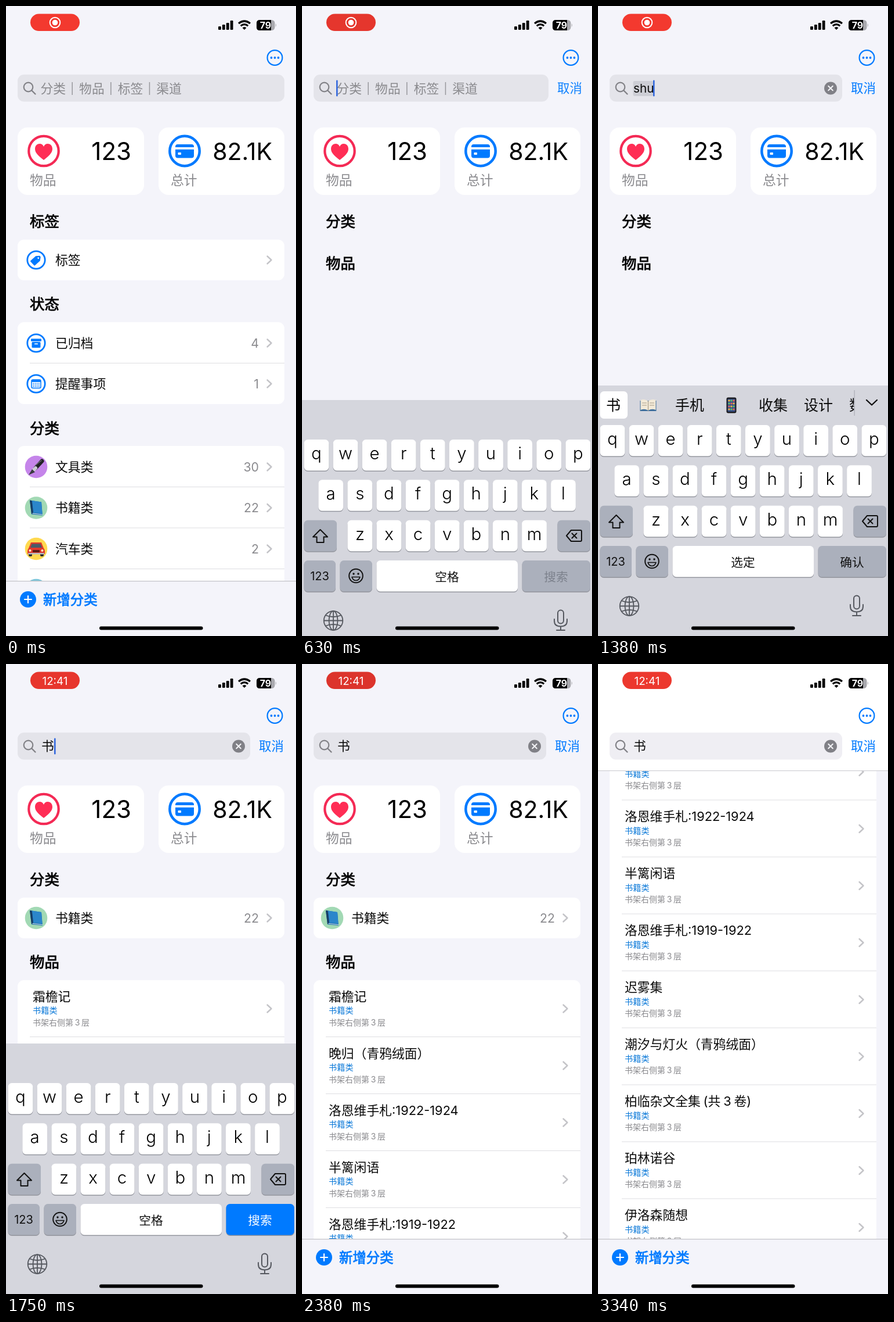
Recreate the animation shown at these times as an HTML page. Size 500 px wide and 1084 px high, loop 3.55 s.

```html
<!DOCTYPE html>
<html lang="zh-CN">
<head>
<meta charset="utf-8">
<title>Item search</title>
<style>
html, body { margin: 0; width: 100%; height: 100%; overflow: hidden; background: #f4f4fa; }
svg { display: block; width: 100%; height: 100%; font-family: Inter, 'Noto Sans CJK SC', 'Noto Sans CJK', sans-serif; }
text { white-space: pre; word-spacing: -1.3px; }
</style>
</head>
<body>
<svg id="stage" viewBox="0 0 500 1084"></svg>
<script>
const LOOP = 3550, LAST_STEP = 26, LAST_START = 3340;
const BG = '#f4f4fa', BLUE = '#007aff', GREY = '#8a8a8e', LINE = '#dddde1', INK = '#0a0a0a';
const BOOKS = ['霜檐记', '晚归（青鸦绒面）', '洛恩维手札:1922-1924', '半篱闲语', '洛恩维手札:1919-1922',
  '迟雾集', '潮汐与灯火（青鸦绒面）', '柏临杂文全集 (共 3 卷)', '珀林诺谷', '伊洛森随想'];
const stage = document.getElementById('stage');

const rect = (x, y, w, h, fill, r = 0, extra = '') =>
  `<rect x="${x}" y="${y}" width="${w}" height="${h}" rx="${r}" fill="${fill}" ${extra}/>`;
const circle = (x, y, r, fill) => `<circle cx="${x}" cy="${y}" r="${r}" fill="${fill}"/>`;
const ring = (x, y, r, color, w) =>
  `<circle cx="${x}" cy="${y}" r="${r}" fill="none" stroke="${color}" stroke-width="${w}"/>`;
const stroke = (d, color, w = 2) =>
  `<path d="${d}" fill="none" stroke="${color}" stroke-width="${w}" stroke-linecap="round" stroke-linejoin="round"/>`;
const fill = (d, color) => `<path d="${d}" fill="${color}"/>`;
// Text placed by its vertical centre
const text = (x, cy, s, size, color = INK, extra = '') =>
  `<text x="${x}" y="${cy + size * .365}" font-size="${size}" fill="${color}" ${extra}>${s}</text>`;
// A thin outline gives a weight between regular and bold
const semibold = (x, cy, s, size, color) => text(x, cy, s, size, color, `stroke="${color}" stroke-width=".8"`);
const at = (x, y, body) => `<g transform="translate(${x} ${y})">${body}</g>`;
const MID = 'text-anchor="middle"', END = 'text-anchor="end"';

const title = (y, s) => semibold(41, y, s, 25.4, '#000');
const card = (y, h) => rect(20, y, 460, h, '#fff', 11);
const divider = y => rect(41, y - .5, 439, 1, LINE);
const chevron = y => stroke(`M450.5 ${y - 6.5}l7 6.5-7 6.5`, '#c4c4c8', 2.4);

const icons = {
  tag: ring(0, 0, 15.2, BLUE, 2.8) + '<g transform="rotate(-42)">' +
    fill('M-8-5.5H4L9-1.5Q10 0 9 1.5L4 5.5H-8Q-9 5.5-9 4.5V-4.5Q-9-5.5-8-5.5Z', BLUE) + circle(5, 0, 1.4, '#fff') + '</g>',
  archive: ring(0, 0, 15.2, BLUE, 2.8) + rect(-9, -7.5, 18, 4.5, BLUE, 1) + rect(-7.5, -2, 15, 10, BLUE, 1.5) +
    rect(-3, .5, 6, 1.8, '#fff', .9),
  calendar: ring(0, 0, 15.2, BLUE, 2.8) + rect(-8, -7, 16, 14.5, 'none', 2.5, `stroke="${BLUE}" stroke-width="1.6"`) +
    rect(-8, -7, 16, 4, BLUE, 1.5) +
    [0, 1, 2].map(r => [0, 1, 2, 3].map(c => circle(-4.8 + c * 3.2, -.6 + r * 2.7, .95, BLUE)).join('')).join(''),
  pen: circle(0, 0, 19.3, '#c585ea') + stroke('M-1 2L10-10', '#222226', 7) + stroke('M-1-3L9-11', '#6a6a72', 1.6) +
    stroke('M-4 5L-1 2', '#c9c9d2', 6) + fill('M-7 4L-2 9-13 14Z', '#3a3a40'),
  book: circle(0, 0, 19.3, '#a2d9b4') + fill('M-11-13L9-10 11 13-8 11Z', '#1769ad') + fill('M-7-12.4L9-10 10.5 10-5 8Z', '#2b86cb') +
    fill('M-11-13L-7.5-12.4-5 8-8 11Z', '#173e66') + stroke('M-6 9.5L10.5 11.5', '#dfe8ee', 1.2),
  car: circle(0, 0, 19.3, '#ffd94f') + rect(-13, 6, 6, 7, '#28282c', 2) + rect(7, 6, 6, 7, '#28282c', 2) +
    fill('M-9-11H9L13-1Q15 1 15 4V9H-15V4Q-15 1-13-1Z', '#e0392d') + fill('M-7.5-8.5H7.5L10-2H-10Z', '#4a5a68') +
    circle(-10.5, 3, 2, '#fff3c4') + circle(10.5, 3, 2, '#fff3c4') + rect(-6, 2, 12, 4, '#5c1a18', 1) + rect(-14, 7, 28, 2.5, '#b9bcc2', 1),
};

const row = (y, icon, label, count = '') =>
  at(52, y, icons[icon]) + text(85, y, label, 21.8) + text(436, y, count, 21.3, GREY, END) + chevron(y);

const stats =
  rect(20, 209, 218, 116, '#fff', 17) + rect(263, 209, 217, 116, '#fff', 17) +
  ring(65, 249.5, 25.7, '#f42a55', 4.2) +
  fill('M65 265C57 259 50 253 50 246C50 240 54 237 58 237Q63 237 65 242Q67 237 72 237C76 237 80 240 80 246C80 253 73 259 65 265Z', '#ff2d55') +
  ring(308, 249.5, 25.7, BLUE, 4.5) + rect(292, 238, 32, 23.5, BLUE, 4) + rect(292, 243, 32, 3.8, '#fff') + rect(296.5, 252, 5.5, 4, '#fff', 1) +
  text(216, 250, '123', 42, '#000', END) + text(459, 250, '82.1K', 41, '#000', END) +
  text(41, 300, '物品', 22.8, GREY) + text(284, 300, '总计', 22.8, GREY);

const home =
  title(371, '标签') + card(402, 70) + row(437, 'tag', '标签') +
  title(513, '状态') + card(544, 141) + row(580, 'archive', '已归档', 4) + divider(614.5) + row(650, 'calendar', '提醒事项', 1) +
  title(727, '分类') + card(757, 300) + row(793, 'pen', '文具类', 30) + divider(827.5) + row(863.5, 'book', '书籍类', 22) +
  divider(898) + row(934, 'car', '汽车类', 2) + divider(968.5) + circle(52, 1005, 19.3, '#7fc6da');

const noResults = title(371, '分类') + title(442.5, '物品');

const results =
  title(371, '分类') + card(402, 70) + row(437, 'book', '书籍类', 22) +
  title(513, '物品') + card(544, BOOKS.length * 98) +
  BOOKS.map((name, i) => at(0, i * 98,
    text(46, 572, name, 21.8) + text(46, 596, '书籍类', 14.2, '#0a78d8') + text(46, 616.5, '书架右侧第 3 层', 14, GREY) +
    chevron(593) + (i < BOOKS.length - 1 ? divider(641.5) : ''))).join('');

const bottomBar =
  rect(0, 990, 500, 94, BG) + rect(0, 989, 500, 1.2, '#c2c2c7') + circle(38, 1021, 14, BLUE) +
  stroke('M32 1021H44M38 1015V1027', '#fff', 2.2) + semibold(64, 1021.5, '新增分类', 23.4, BLUE);

const wifi = '<g fill="none" stroke="#000" stroke-width="3.2"><path d="M401 30Q411 22 421 30"/><path d="M404.7 34.2Q411 29.2 417.3 34.2"/></g>' +
  fill('M407.5 37.5Q411 34.5 414.5 37.5L411 41Z', '#000');
const statusBar =
  [6, 9, 12, 16].map((h, i) => rect(366 + i * 6.9, 41 - h, 4.8, h, '#000', 1.3)).join('') + wifi +
  rect(432, 24, 31.5, 18, '#a9a9ae', 5.5) + fill('M437.5 24H457V42H437.5Q432 42 432 36.5V29.5Q432 24 437.5 24Z', '#000') +
  fill('M464.8 30Q467 33 464.8 36Z', '#a9a9ae') + text(447.5, 33, '79', 16, '#fff', MID + ' font-weight="700"') +
  ring(463.5, 89, 12.9, BLUE, 2.2) + [-6, 0, 6].map(d => circle(463.5 + d, 89, 1.9, BLUE)).join('');

const PULSE = [[0, .7], [500, .05], [1000, 1], [1380, .7], [2000, .12], [2880, 0], [3340, .5], [3550, .7]];
function interpolate(points, t) {
  const i = Math.max(1, points.findIndex(p => p[0] >= t));
  const [t0, a] = points[i - 1], [t1, b] = points[i];
  return a + (b - a) * (t - t0) / (t1 - t0);
}

function pill(step, t) {
  const k = interpolate(PULSE, t), mix = (a, b) => Math.round(a + (b - a) * k);
  return rect(42, 13.5, 85, 29.5, `rgb(${mix(218, 254)},${mix(52, 59)},${mix(44, 48)})`, 14.75) +
    (step < 14 ? ring(84.5, 28.5, 8.8, '#fff', 2) + circle(84.5, 28.5, 4.8, '#fff')
               : text(84.5, 28.8, '12:41', 18.8, '#fff', MID));
}

function searchBar({ query, composing, p, caret, white }) {
  const widths = { '': 0, s: 11, sh: 23, shu: 35, '书': 23 };
  const caretX = query ? 60 + widths[query] : 59;
  let out = rect(20, 118, 401 + 59 * p, 46.5, white ? '#efeef3' : '#e4e4ea', 11) +
    ring(38.5, 139.5, 7.8, '#828287', 2.2) + stroke('M44.5 145.5L50.5 151.5', '#828287', 2.4);
  if (composing) out += rect(60.5, 129, widths[query], 26, '#cdced5', 3);
  if (query) {
    out += text(61, 141.5, query, composing ? 20.7 : 21.8) + circle(401, 141.5, 11, '#808086') +
      stroke('M397.2 137.7l7.6 7.6m0-7.6l-7.6 7.6', '#f4f4f8', 2);
  } else {
    out += ['分类', '物品', '标签', '渠道'].map((s, i) => text(59.5 + 66.6 * i, 142, s, 21.8, GREY) +
      (i < 3 ? rect(113.5 + 66.6 * i, 131, 1.5, 22, '#97979c') : '')).join('');
  }
  if (caret) out += rect(caretX, 127.5, 2.6, 28, '#3268dd', 1.3);
  if (p < 1) out += text(436 + 59 * p, 141, '取消', 21.5, BLUE, `opacity="${1 - p}"`);
  return out;
}

const key = (x, y, w, color = '#fff') => rect(x, y + 1.5, w, 53.5, '#94969e', 6.5) + rect(x, y, w, 53.5, color, 6.5);
const KEY_ROWS = [['qwertyuiop', 3.5, 721], ['asdfghjkl', 28.3, 790.3], ['zxcvbnm', 78.5, 859.7]];
const keyPos = c => {
  const [s, x, y] = KEY_ROWS.find(r => r[0].includes(c));
  return [x + 50.1 * s.indexOf(c), y];
};
const letter = (x, y, c, size) => `<text x="${x}" y="${y}" font-size="${size}" font-weight="300" fill="#000" ${MID}>${c}</text>`;

function popup(c) {
  const [x, y] = keyPos(c);
  return at(x + 21.5, y, `<path d="M-27-83H27Q38-83 38-72V-32Q38-23 32-18L26-12Q21.5-8 21.5-1V48Q21.5 54 15 54H-15Q-21.5 54-21.5 48V-1Q-21.5-8-26-12L-32-18Q-38-23-38-32V-72Q-38-83-27-83Z"
    fill="#fff" stroke="#b9bac2" stroke-width=".8"/>` + letter(0, -30, c, 45));
}

const openBook = at(86.5, 687, fill('M-14-8L14-8V10H-14Z', '#3e6e9c') + fill('M0-7Q-6-12-13-9V8Q-6 5 0 9Q6 5 13 8V-9Q6-12 0-7Z', '#f3ead8') +
  stroke('M0-7V9M-10-4H-3M-10 0H-3M3-4H10M3 0H10', '#a79c88', 1.2));
const phone = at(230, 687, rect(-8.5, -13.5, 17, 27, '#1c1c20', 3) + rect(-6.5, -11, 13, 22, '#36518a', 1) +
  [0, 1, 2, 3].map(r => [0, 1, 2].map(c =>
    rect(-5.5 + c * 4, -9.5 + r * 5, 3, 3, ['#f4b63e', '#62c46a', '#e9655c'][(r + c) % 3], .8)).join('')).join(''));
const candidates =
  rect(3.5, 663, 47.5, 47, '#fff', 6.5) + text(26.5, 687, '书', 25, '#000', MID) + openBook + text(133, 687, '手机', 25) + phone +
  text(277, 687, '收集', 25) + text(355, 687, '设计', 25) +
  `<svg x="425" y="660" width="16.5" height="50">${text(8, 27, '数', 25)}</svg>` +
  rect(441.5, 661, 1.3, 44, '#aeb0b8') + stroke('M463 678L472 686.5 481 678', '#111', 2.4);

const globe = at(54, 1032.5, ring(0, 0, 16.3, '#55585f', 1.8) +
  '<ellipse rx="7.5" ry="16.3" fill="none" stroke="#55585f" stroke-width="1.8"/>' +
  stroke('M0-16V16M-16 0H16M-13-9Q0-4 13-9M-13 9Q0 4 13 9', '#55585f', 1.8));
const mic = at(446, 1032, rect(-5, -17.5, 10, 23, 'none', 5, 'stroke="#55585f" stroke-width="2"') +
  stroke('M-11-2V1Q-11 10.5 0 10.5Q11 10.5 11 1V-2M0 10.5V17M-7 17H7', '#55585f', 2));
const smile = at(93, 955.5, ring(0, 0, 11.8, '#111', 2) + circle(-4, -3.5, 1.7, '#111') + circle(4, -3.5, 1.7, '#111') +
  stroke('M-7 2H7Q5 8 0 8Q-5 8-7 2Z', '#111', 1.6));

function keyboard({ query, composing, pressed, offset, bar }) {
  const dark = '#abb0bc', ready = query === '书';
  let out = rect(0, 653, 500, 440, '#d5d6dd');
  for (const [letters] of KEY_ROWS) for (const c of letters) {
    const [x, y] = keyPos(c);
    out += key(x, y, 42.8) + letter(x + 21.4, y + 34, c, 29.5);
  }
  out += key(3.5, 859.7, 56.5, dark) + stroke('M31.5 876L44 888.5H37.5V898H25.5V888.5H19Z', '#111', 2) +
    key(440.5, 859.7, 56.5, dark) + stroke('M464 877H480Q482 877 482 879V894Q482 896 480 896H464L456 886.5Z', '#111', 2) +
    stroke('M465.5 882.5l8 8m0-8l-8 8', '#111', 2) +
    key(3.5, 929, 54.5, dark) + text(30.5, 956, '123', 20, '#111', MID) + key(65.5, 929, 55.5, dark) + smile +
    key(128.5, 929, 243.5) + text(250, 957, bar ? '选定' : '空格', 20.7, '#111', MID) +
    key(379.5, 929, 117.5, ready ? BLUE : dark) +
    text(438, 957, composing ? '确认' : '搜索', 20.7, ready ? '#fff' : composing ? '#111' : '#7c818c', MID) + globe + mic;
  if (bar) out += candidates;
  if (pressed) out += popup(pressed);
  return at(0, offset, out);
}

// Keyed values: each entry holds from its step until the next entry
const hold = (entries, step) => entries.filter(e => e[0] <= step).pop()[1];
const KEYBOARD_OFFSET = [[0, 431], [3, 325], [4, 120], [5, 25], [6, 0], [16, 127.5], [17, 325], [18, 410], [19, 431]];
const SCROLL = [[0, 0], [21, 12], [22, 60], [23, 143.5], [24, 275], [25, 415], [26, 505.5]];
const QUERY = [[0, ''], [8, 's'], [9, 'sh'], [10, 'shu'], [14, '书']];
const PRESSED = [[0, ''], [8, 's'], [9, 'h'], [10, 'u'], [11, '']];

function draw(step, t) {
  const query = hold(QUERY, step), offset = hold(KEYBOARD_OFFSET, step), scroll = hold(SCROLL, step);
  const composing = step >= 8 && step < 14, white = scroll > 9;
  const p = step < 8 ? Math.min(1, offset / 375) : 0;
  const list = step < 4 ? home : step < 14 ? noResults : results;
  stage.innerHTML = rect(0, 0, 500, 1084, BG) + at(0, -scroll, stats + list) +
    rect(0, 0, 500, 184, white ? '#fff' : BG) + (white ? rect(0, 183, 500, 1.2, '#cfcfd4') : '') +
    statusBar + pill(step, t) +
    searchBar({ query, composing, p, caret: step >= 4 && step < 16, white }) + bottomBar +
    (offset < 431 ? keyboard({ query, composing, offset, pressed: hold(PRESSED, step), bar: step >= 9 && step < 14 }) : '') +
    rect(161, 1067.5, 178.5, 6, '#000', 3);
}

const stepStart = i => i === LAST_STEP ? LAST_START : 10 * Math.round(12.5 * i);
const origin = performance.now();
let shown = -1;
function tick() {
  const t = (performance.now() - origin) % LOOP;
  let step = t >= LAST_START ? LAST_STEP : Math.min(LAST_STEP - 1, Math.floor(t / 125));
  if (t < stepStart(step)) step--;
  if (step !== shown) draw(shown = step, stepStart(step));
  requestAnimationFrame(tick);
}
tick();
</script>
</body>
</html>
```
